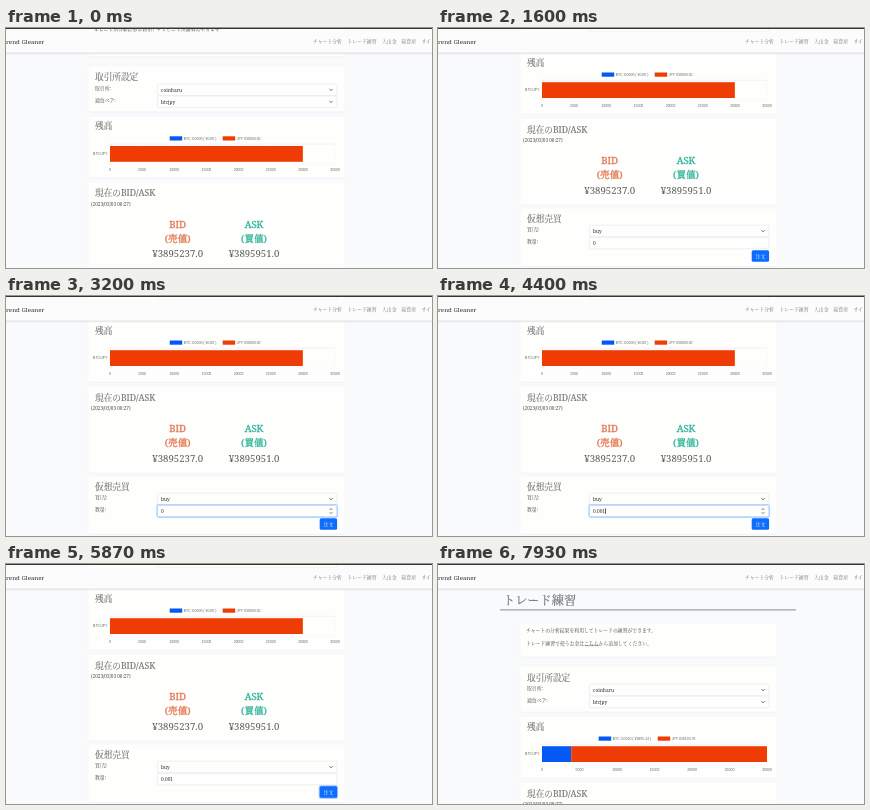
Write an HTML page that moves like this. It is 426 by 240 pixels and loops after 8 s.

```html
<!DOCTYPE html>
<html lang="ja">
<head>
<meta charset="utf-8">
<style>
html, body { margin: 0; width: 100%; height: 100%; overflow: hidden; background: #f8fafc; }
svg { display: block; width: 100vw; height: 100vh; }
text { font-family: "Noto Serif", "Noto Serif CJK JP", "Noto Sans CJK JP", serif; white-space: pre; }
text.s { font-family: "Liberation Sans", "Noto Sans CJK JP", sans-serif; }
</style>
</head>
<body>
<svg id="stage" viewBox="0 0 426 240" preserveAspectRatio="none"></svg>
<script>
const LOOP = 8000, RELOAD = 6400, GROW = 6500;
const BLUE = '#0459f5', RED = '#ee3c04';
const stage = document.getElementById('stage');

function add(parent, tag, attrs) {
  const node = document.createElementNS('http://www.w3.org/2000/svg', tag);
  for (const k in attrs) node.setAttribute(k, attrs[k]);
  return parent.appendChild(node);
}
const set = (node, attrs) => { for (const k in attrs) node.setAttribute(k, attrs[k]); };
const show = (node, on) => node.setAttribute('visibility', on ? 'visible' : 'hidden');
const rect = (p, x, y, width, height, fill, more) =>
  add(p, 'rect', { x, y, width, height, fill, ...more });
const path = (p, d, stroke, w = 0.5) =>
  add(p, 'path', { d, stroke, 'stroke-width': w, fill: 'none' });

// y is the middle of the line
function text(p, str, x, y, size = 4.85, fill = '#444', more = {}) {
  const node = add(p, 'text', { x, y: y + size * 0.37, 'font-size': size, fill, ...more });
  node.textContent = str;
  return node;
}
const mid = { 'text-anchor': 'middle' };
const medium = (stroke, w) => ({ stroke, 'stroke-width': w });
const small = (p, str, x, y, more) => text(p, str, x, y, 3.5, '#666', { class: 's', ...more });

function card(y, h) {
  rect(page, 82, y + 0.6, 257, h, '#000', { rx: 2, opacity: 0.03 });
  rect(page, 82, y, 257, h, '#fefefd', { rx: 2, stroke: '#f0f0f4', 'stroke-width': 0.4 });
}
const heading = (str, y) => text(page, str, 89, y + 0.3, 8.65, '#777', medium('#777', 0.15));
const box = y => rect(page, 151.3, y, 179.7, 11.6, '#fefefd',
  { rx: 1.4, stroke: '#d5dae2', 'stroke-width': 0.4 });

function select(label, value, y) {
  text(page, label, 89, y - 1.5);
  box(y - 5.8);
  text(page, value, 155, y, 4.85, '#333');
  path(page, `M323.4 ${y - 0.8}l1.6 1.6l1.6 -1.6`, '#444', 0.8);
}

function quote(name, kanji, price, x, fill) {
  const style = { ...mid, ...medium(fill, 0.3) };
  text(page, name, x, 260.2, 9.6, fill, style);
  text(page, kanji, x, 274.4, 9.6, fill, style);
  text(page, price, x, 290, 9.6, '#5a5a5a', mid);
}

rect(stage, 0, 0, 426, 240, '#f8fafc');
const page = add(stage, 'g', {});

text(page, 'トレード練習', 65, 36, 12.2, '#777', medium('#777', 0.2));
rect(page, 62, 45.4, 296, 1, '#8a8a8a');

card(59, 34);
text(page, 'チャートの分析結果を利用してトレードの練習ができます。', 88, 66);
text(page, 'トレード練習で使うお金はこちらから追加してください。', 88, 79);
path(page, 'M146.5 81.6h14.5', '#555');

card(102, 46);
heading('取引所設定', 113);
select('取引所:', 'coinharu', 126);
select('通貨ペア:', 'btcjpy', 138);

card(152, 62);
heading('残高', 162);
const chart = add(page, 'g', {});

card(218, 87);
heading('現在のBID/ASK', 229);
text(page, '(2023/05/03 00:27)', 85, 240.4, 4.65);
quote('BID', '(売値)', '¥3895237.0', 171.7, '#e3754f');
quote('ASK', '(買値)', '¥3895951.0', 248, '#2db497');

card(308, 58);
heading('仮想売買', 318);
select('買/売:', 'buy', 331);
text(page, '数量:', 89, 341);
box(337.2);
const ring = add(page, 'g', {});
rect(ring, 150.8, 336.7, 180.7, 12.6, 'none', { rx: 1.8, stroke: '#c2dbfe', 'stroke-width': 1.2 });
rect(ring, 151.3, 337.2, 179.7, 11.6, '#fefefd', { rx: 1.4, stroke: '#86b7fe', 'stroke-width': 0.6 });
path(ring, 'M323.6 342l1.4 -1.5l1.4 1.5M323.6 344.2l1.4 1.5l1.4 -1.5', '#555', 0.7);
const amount = text(page, '0', 155, 343, 4.85, '#333');
const caret = rect(page, 0, 340.2, 0.7, 5.8, '#222');
const pressed = rect(page, 312.7, 349.2, 19.4, 13.6, '#9ec5fe', { rx: 2.2 });
rect(page, 313.7, 350.2, 17.4, 11.6, '#0d6efd', { rx: 1.5 });
text(page, '注文', 322.4, 356, 4.85, '#fff', mid);

// Balance chart, built once per state
function balance(max, legend, red, btc, jpy) {
  const g = add(chart, 'g', {}), px = v => 225 * v / max;
  for (let v = 0; v <= max; v += 5000) {
    const x = 104 + px(v);
    path(g, `M${x} 180V201.5`, '#f3f3f5', 0.4);
    small(g, String(v), x, 206.2, mid);
  }
  path(g, 'M104 180.3H329', '#e4e2ee', 0.5);
  path(g, 'M101 200H329', '#f3f3f5', 0.4);
  small(g, 'BTC/JPY', 101.5, 190, { 'text-anchor': 'end' });
  [[legend, BLUE, `BTC ${btc}`], [red, RED, `JPY ${jpy}`]].forEach(([x, fill, str]) => {
    rect(g, x, 172.5, 12.5, 4.2, fill);
    small(g, str, x + 14, 174.7);
  });
  const bars = [BLUE, RED].map(fill => rect(g, 104, 182.2, 0, 15.8, fill));
  const draw = (a, b, k) => {
    set(bars[0], { width: px(a * k) });
    set(bars[1], { x: 104 + px(a * k), width: px(b * k) });
  };
  return { g, draw };
}
const before = balance(35000, 163.7, 216.7, '0.0000 ( ¥0.00 )', '¥30000.00');
const after = balance(30000, 160.7, 219.7, '0.0010 ( ¥3895.24 )', '¥26103.76');
before.draw(0, 30000, 1);

// Sticky bar; the page stays visible in the gap above it
rect(stage, 0, 25, 426, 1.6, '#000', { opacity: 0.04 });
rect(stage, 0, 3.5, 426, 21.5, '#fcfcfc');
rect(stage, 0, 24.7, 426, 0.6, '#d4d4de');
rect(stage, 0, 0, 426, 1, '#39352c');
text(stage, 'rend Gleaner', 0, 13.8, 6.1, '#333');
[['チャート分析', 307], ['トレード練習', 341.5], ['入出金', 376], ['総資産', 395.5], ['サイト', 415.5]]
  .forEach(([str, x]) => text(stage, str, x, 13.3, 4.85, '#777'));

const clamp = v => Math.min(1, Math.max(0, v));
const FOCUS = 2500, TYPE = 3600, KEY = 200, SUBMIT = 5700;

function render(t) {
  const fresh = t >= RELOAD;
  const scroll = fresh ? 0 : 128 - 64 * Math.pow(1 - clamp(t / 650), 2);
  set(page, { transform: `translate(0 ${-scroll})` });

  show(before.g, !fresh);
  show(after.g, fresh);
  after.draw(3895.24, 26103.76, 1 - Math.pow(1 - clamp((t - GROW) / 1000), 4));

  const keys = fresh ? 0 : Math.min(4, Math.max(0, Math.floor((t - TYPE) / KEY) + 1));
  amount.textContent = '0.001'.slice(0, 1 + keys);
  const focused = t >= FOCUS && t < SUBMIT;
  const since = t - (keys ? TYPE + (keys - 1) * KEY : FOCUS);
  show(ring, focused);
  show(caret, focused && since % 1000 < 500);
  set(caret, { x: 155.2 + amount.getComputedTextLength() });
  show(pressed, t >= SUBMIT && !fresh);
}

const start = performance.now();
function tick() {
  render((performance.now() - start) % LOOP);
  requestAnimationFrame(tick);
}
tick();
</script>
</body>
</html>
```
